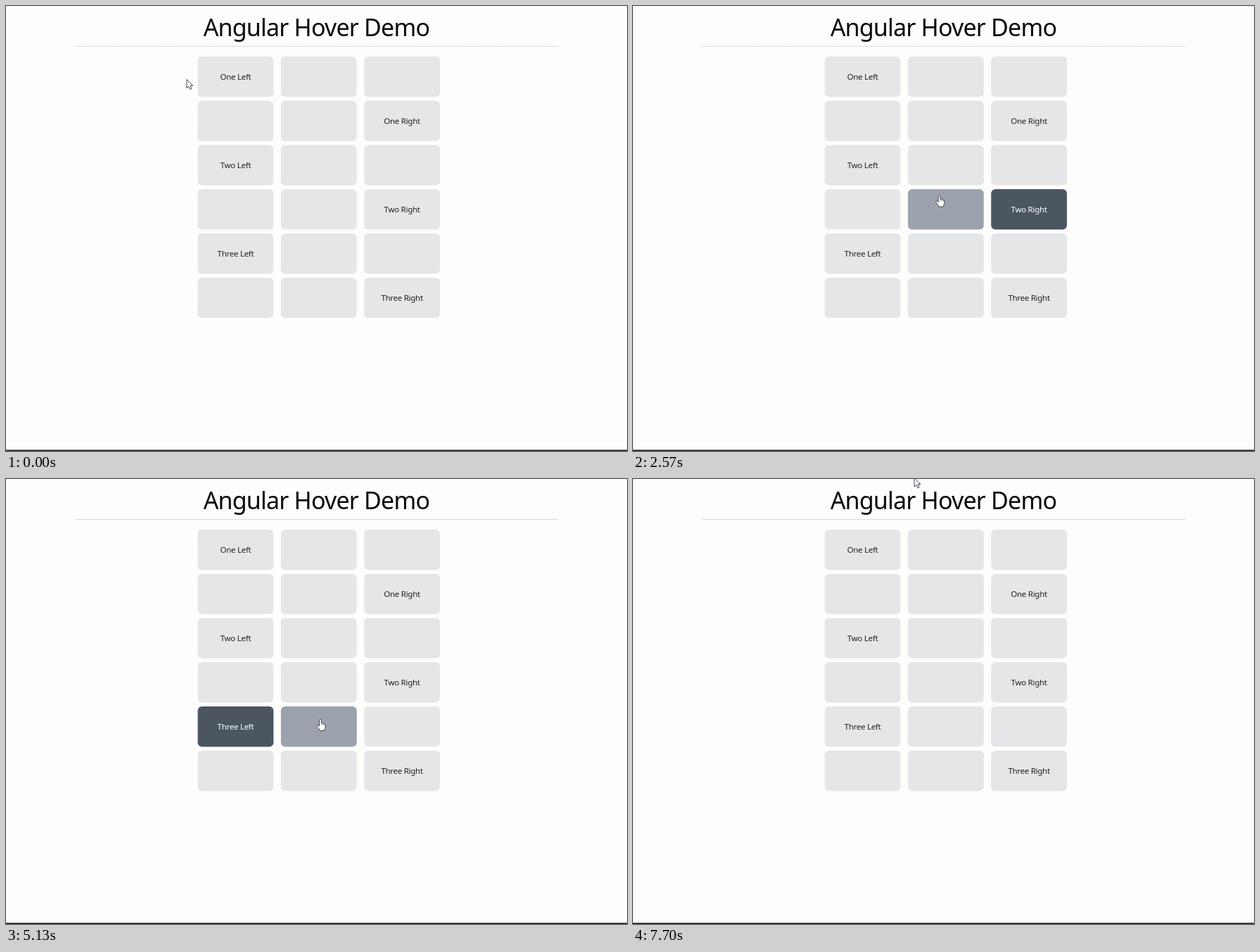
An HTML page with a canvas that plays this animation: 883 by 634 pixels, repeating every 7770 ms.

```html
<!DOCTYPE html>
<html lang="en">
<head>
<meta charset="utf-8">
<title>Angular Hover Demo</title>
<style>
  html, body { margin: 0; width: 100%; height: 100%; overflow: hidden; background: #fdfdfb; }
  canvas { display: block; }
</style>
</head>
<body>
<canvas id="stage" width="883" height="634"></canvas>
<script>
const ctx = document.getElementById('stage').getContext('2d');
const LOOP = 7770;
const FONT = '"Noto Sans", "Open Sans", sans-serif';
const LABELS = ['One', 'Two', 'Three'].flatMap(n => [n + ' Left', n + ' Right']);
const GRID = { x: 272.6, y: 72, w: 107.8, h: 57.5, stepX: 118.3, stepY: 63, left: 269, top: 69.5 };
const SHADES = ['#4b5661', '#9ba2ae', '#e5e7e9'];
const IDLE = '#e4e6e8';

// The pointer visits every row downwards, then upwards, and leaves at the top.
const MOVE_TIME = 370;
const STARTS = [300, 1100, 1800, 2330, 3230, 3770, 4570, 5070, 5700, 6300, 6870, 7330];
const ENTRY = { x: 257, y: 104.5 };
const EXIT = { x: 400, y: -1.5 };
const LOWEST = 402;

const rowCenter = row => GRID.y + row * GRID.stepY + GRID.h / 2;
const down = LABELS.map((_, row) => ({ x: 434 + row * 0.6, y: Math.min(LOWEST, rowCenter(row) + 2) }));
const up = LABELS.slice(1).map((_, row) => ({ x: 447, y: rowCenter(row) })).reverse();
const STOPS = [ENTRY, ...down, ...up, EXIT];

const ARROW = new Path2D('M0 0 V12.6 L2.9 10 L4.7 14.2 L6.9 13.3 L5.1 9.1 H8.7 Z');
const HAND = new Path2D(
  'M-1.4 1.3 Q-1.4 0 0 0 Q1.4 0 1.4 1.3 V5.3 Q2.8 4.6 3.6 5.8 Q4.9 5.3 5.5 6.5 ' +
  'Q7 6.3 7 8 V11.5 Q7 13 5.7 14.5 V16.2 H-1 V14.8 L-4.6 10.2 ' +
  'Q-5.6 8.7 -4.4 8.1 Q-3.3 7.6 -1.4 9.8 Z');
const KNUCKLES = new Path2D('M1.4 5.3 V8 M3.6 5.8 V8.3 M5.5 6.5 V8.6');

function pointerAt(t) {
  const i = STARTS.findLastIndex(start => t >= start);
  if (i < 0) return ENTRY;
  const a = STOPS[i], b = STOPS[i + 1];
  const k = Math.min(1, (t - STARTS[i]) / MOVE_TIME);
  return { x: a.x + (b.x - a.x) * k, y: a.y + (b.y - a.y) * k };
}

function hoveredRow({ x, y }) {
  const row = Math.floor((y - GRID.top) / GRID.stepY);
  return x >= GRID.left && row >= 0 && row < LABELS.length ? row : -1;
}

function text(str, x, y, size, color) {
  ctx.font = `${size}px ${FONT}`;
  ctx.letterSpacing = `${-0.024 * size}px`;
  ctx.textAlign = 'center';
  ctx.fillStyle = color;
  ctx.fillText(str, x, y);
}

function drawRow(row, active) {
  const right = row % 2;
  const y = GRID.y + row * GRID.stepY;
  for (let col = 0; col < 3; col++) {
    const x = GRID.x + col * GRID.stepX;
    const dist = right ? 2 - col : col;
    ctx.fillStyle = active ? SHADES[dist] : IDLE;
    ctx.beginPath();
    ctx.roundRect(x, y, GRID.w, GRID.h, 6);
    ctx.fill();
    if (dist === 0) text(LABELS[row], x + GRID.w / 2, y + 33, 11.5, active ? '#fff' : '#222');
  }
}

function drawPointer({ x, y }, hand) {
  ctx.save();
  ctx.translate(x, y);
  ctx.lineJoin = 'round';
  ctx.lineWidth = 0.9;
  ctx.fillStyle = '#fff';
  ctx.strokeStyle = hand ? '#3a3a3a' : '#2b2b48';
  const shape = hand ? HAND : ARROW;
  ctx.fill(shape);
  ctx.stroke(shape);
  if (hand) {
    ctx.lineWidth = 0.6;
    ctx.stroke(KNUCKLES);
  }
  ctx.restore();
}

function draw(t) {
  ctx.fillStyle = '#fdfdfb';
  ctx.fillRect(0, 0, 883, 634);
  text('Angular Hover Demo', 441.4, 43, 34, '#080808');

  ctx.fillStyle = '#b8b8b4';
  for (let x = 98; x < 785; x += 2) ctx.fillRect(x, 57, 1, 1);

  const pointer = pointerAt(t);
  const hover = hoveredRow(pointer);
  LABELS.forEach((_, row) => drawRow(row, row === hover));

  ctx.fillStyle = '#16161a';
  ctx.fillRect(0, 632.4, 883, 1.6);
  drawPointer(pointer, hover >= 0);
}

const begin = performance.now();
function frame() {
  draw((performance.now() - begin) % LOOP);
  requestAnimationFrame(frame);
}
frame();
</script>
</body>
</html>
```
